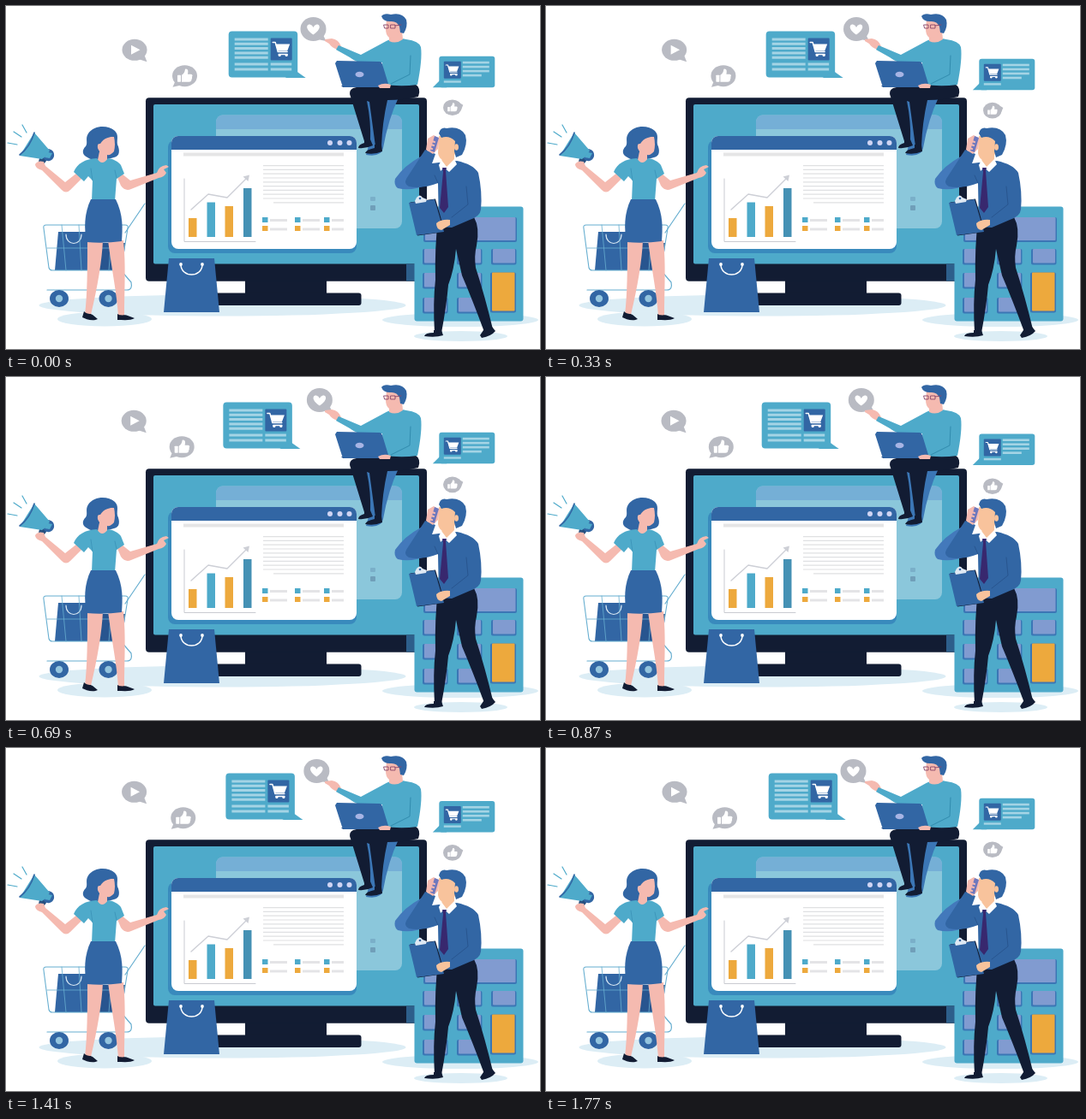
Animation, 623 px wide and 401 px high, one loop 1800 ms. Source, as an HTML page with a canvas:

```html
<!DOCTYPE html>
<html lang="en">
<head>
<meta charset="utf-8">
<title>Online marketing</title>
<style>
html, body { margin: 0; width: 100%; height: 100%; overflow: hidden; background: #fff; }
canvas { display: block; }
</style>
</head>
<body>
<canvas id="stage" width="623" height="401"></canvas>
<script>
const ctx = document.getElementById('stage').getContext('2d');
const NAVY = '#121c33', TEAL = '#4eaaca', BLUE = '#3266a4', DEEP = '#28558f', SKIN = '#f5bab0',
  PEACH = '#f8c39c', ORANGE = '#eda93d', GRAY = '#b9bbc3', PALE = '#a4d4e5', SHADE = '#3b76b5',
  GROUND = '#dcedf5', KEY = '#819bd0', LINE = '#67aed0';
let g = ctx;

const fill = (c, d) => { g.fillStyle = c; g.fill(new Path2D(d)); };
function line(c, w, d) {
  g.strokeStyle = c;
  g.lineWidth = w;
  g.lineCap = g.lineJoin = 'round';
  g.stroke(new Path2D(d));
}
function box(c, x, y, w, h, r = 0) {
  g.fillStyle = c;
  g.beginPath();
  g.roundRect(x, y, w, h, r);
  g.fill();
}
function oval(c, x, y, rx, ry = rx) {
  g.fillStyle = c;
  g.beginPath();
  g.ellipse(x, y, rx, ry, 0, 0, Math.PI * 2);
  g.fill();
}
function at(x, y, draw, k = 1) {
  g.save();
  g.translate(x, y);
  g.scale(k, k);
  draw();
  g.restore();
}

function ground() {
  oval(GROUND, 252.5, 350, 214, 12.5);
  oval(GROUND, 115, 366, 55, 8.5);
  oval(GROUND, 530, 367, 91, 8);
  oval(GROUND, 530.5, 386, 54.5, 6);
}

function monitor() {
  box(NAVY, 279, 318, 95, 20);
  box(NAVY, 236, 335.5, 178.5, 14.5, 3);
  box(NAVY, 163, 107.3, 328, 214.5, 4);
  box(TEAL, 172, 115, 310, 186.5, 2);
  box('#8bc7db', 245, 127.5, 217, 132.5, 8);
  box('#75afd6', 245, 127.5, 217, 16.5, [8, 8, 0, 0]);
  box('#7aafc9', 425, 223, 6, 5, 1);
  box('#709fb9', 425, 233, 6, 6, 1);
  box('#2d5f8b', 467, 301.5, 10, 20);
}

function browser() {
  box('#398abd', 189, 157, 220, 132, 8);
  box('#fff', 193, 152, 216, 132, 8);
  box(BLUE, 193, 152, 216, 16, [8, 8, 0, 0]);
  for (const x of [378, 389.5, 400.5]) oval('#d0d5f4', x, 160, 3);
  box('#e5e5e6', 207, 171.5, 187, 4);

  line('#c9cbd1', 1, 'M208 202V275.5H291');
  const bars = [[213, 248, ORANGE], [234.5, 229.5, TEAL], [255.5, 234, ORANGE], [277, 213, '#4591b4']];
  for (const [x, y, c] of bars) box(c, x, y, 9.5, 270 - y);
  line('#cdcfd6', 1.4, 'M216 238L236 220L258 224L281 201');
  fill('#cdcfd6', 'M284 197.5L282.5 205L276.5 199.5Z');

  for (let i = 0; i < 10; i++) {
    const x = i === 9 ? 312 : 300;
    box('#dfe0e2', x, 186 + i * 4.8, 394 - x, 1.2);
  }
  [299, 337, 371].forEach((x, i) => {
    box(TEAL, x, 247, 6.5, 6);
    box(ORANGE, x, 257, 6.5, 6);
    const w = i === 2 ? 14 : 20;
    box('#e4e4e6', x + 9, 249, w, 3);
    box('#e4e4e6', x + 9, 259.5, w, 3);
  });
}

function frontBag() {
  fill(BLUE, 'M190 295H243L249 358H184Z');
  line('#fff', 1.5, 'M204 302C204 318 229 318 229 302');
  oval('#fff', 204, 302, 1.9);
  oval('#fff', 229, 302, 1.9);
}

function trolley() {
  fill(DEEP, 'M108 277H139L136 309H108Z');
  fill(BLUE, 'M61 264H97L103 309H57Z');
  line('#d7e6f2', 1.2, 'M70 267C70 281 88 281 88 267');
  line(LINE, 1.1, 'M47 256H139Q143 256 142 260L134 309H54Q51 309 50 306L44 260Q43 256 47 256Z');
  line(LINE, .8, 'M48 283H138M65 256L70 309M85 256L88 309M105 256V309M124 256L120 309');
  line(LINE, 1.2, 'M139 265L162 231M134 309L146 323Q148 332 141 332H48');
  for (const x of [62, 119.5]) {
    oval(BLUE, x, 342, 11, 10);
    oval('#94c5df', x, 342, 4.2);
  }
}

function megaphone() {
  line(TEAL, 1.2, 'M19 139L24 148M9 147L18 153M2 160L13 162');
  fill('#27507f', 'M39 178L46 176L47 181L42 188L37 186Z');
  fill(BLUE, 'M41 173C45 167 50 166 54 169C58 173 56 180 51 181C47 182 43 179 41 173Z');
  fill(TEAL, 'M33 148L51 169Q48 175 42 179L16 175Z');
  fill(TEAL, 'M49 171L54 172L51 178L45 177Z');
  line(BLUE, 1.6, 'M33 148Q28 165 16 174');
}

function woman() {
  fill(SKIN, 'M95 274H113C112 297 107 328 99 361H92C95 337 95 305 95 274Z');
  fill(SKIN, 'M119 274H137C140 304 138 330 138 362H131C129 334 123 306 119 274Z');
  fill(NAVY, 'M91 357C95 361 98 359 101 361L107 366C101 369 93 366 89 364Z');
  fill(NAVY, 'M130 360C135 363 139 360 142 362L150 365C146 368 137 367 130 367Z');
  fill(SKIN, 'M83 195L90 200L75 215Q70 220 65 215L42 192Q34 190 34 185Q37 180 44 182L46 187L69 206Z');
  fill(SKIN, 'M129 198L135 196L145 204L176 195Q178 187 187 186L190 188L184 191L187 195Q185 200 178 201L146 214Q139 217 134 210Z');
  fill(BLUE, 'M96 149C103 139 119 139 127 146C132 151 129 156 130 162C133 168 133 176 126 177C112 181 102 182 95 177C89 174 88 169 93 164C96 160 92 155 96 149Z');
  fill(SKIN, 'M108 158Q115 151 126 153Q128 162 126 170Q122 175 118 174L118 184Q111 188 107 180L109 170Q105 165 108 158Z');
  fill(BLUE, 'M101 148C112 141 125 143 129 152C121 153 114 154 110 161C106 160 105 166 109 170C106 176 103 176 99 177Z');
  fill(TEAL, 'M106 178Q112 188 119 178C126 179 131 182 134 186L138 196L129 202L127 228H100L101 204L96 199L91 205L79 194C83 184 92 179 106 178Z');
  line('#3a91b6', .8, 'M101 204L99 190M129 201L127 192');
  fill(BLUE, 'M99 226H128C137 244 136 260 135 275Q114 278 94 276C91 260 91 243 99 226Z');
}

function sitter() {
  fill(SHADE, 'M420 108L458 107Q446 132 440 166Q438 177 420 174L424 160Z');
  // legs and shoes
  fill(NAVY, 'M405 96Q426 90 477 91Q485 96 481 106Q464 110 445 110Q439 136 438 164H431L424 112L421 111Q426 135 425 158H418L402 106Q399 99 405 96Z');
  fill(NAVY, 'M418 156H425L428 163Q420 167 411 166Q411 162 418 160Z');
  fill(NAVY, 'M430 162H438L439 170Q430 174 419 172Q420 168 430 166Z');
  // pointing arm and torso
  fill(SKIN, 'M372 39L380 38Q388 39 391 47L387 51Q380 49 377 44L372 41Z');
  fill(TEAL, 'M388 46L414 57L440 43Q452 35 467 39Q482 41 484 48Q486 62 480 92Q457 95 440 91L439 66L420 67Q410 67 401 60L385 51Z');
  fill(SKIN, 'M447 31L462 29L463 39Q455 45 447 41Z');
  fill(SKIN, 'M444 16H460L463 29Q456 38 447 37Q443 34 443 27Z');
  fill(BLUE, 'M438 12Q441 8 449 10Q462 7 467 16Q469 24 464 32L460 31L459 24Q456 17 448 18Q440 18 438 12Z');
  line('#8a4668', .9, 'M441 22H446V26H442ZM449 22H454V26H449ZM454 23L461 22');
  line('#318cae', 1, 'M472 58L471 80L449 91');
  // laptop
  fill(DEEP, 'M391 93L444 91L447 95H393Z');
  fill(BLUE, 'M386 64L436 65Q438 65 439 68L446 91Q446 94 443 95H396Q393 95 392 92L384 67Z');
  oval('#a7b4e4', 412.5, 80, 5, 3.3);
  fill(SKIN, 'M434 93Q441 89 449 92L448 96H436Z');
}

function calculator() {
  box(TEAL, 476.5, 234.5, 127, 134, 3);
  const key = (x, y, w, h, c = KEY) => {
    box(SHADE, x, y, w, h, 2);
    box(c, x + 2, y, w - 3.5, h - 2, 1);
  };
  key(487, 247, 109, 29);
  for (const y of [284, 312, 341]) {
    for (const x of [486, 526, 566]) {
      if (x < 566 || y < 300) key(x, y, 29.5, 18.5);
    }
  }
  key(565, 311.5, 30, 47, ORANGE);
}

function caller() {
  fill('#4379bb', 'M454 202Q465 186 484 176L491 173V209Q473 217 457 213Q452 209 454 202Z');
  // trousers and shoes
  fill(NAVY, 'M504 249L546 247Q553 259 549 280Q546 292 548 306Q559 340 568 378L558 381Q544 343 532 315L525 284Q523 308 516 326Q514 350 508 382H500Q498 346 501 320Q500 283 504 249Z');
  fill(NAVY, 'M499 379H508L510 385Q501 388 488 386Q489 382 499 382Z');
  fill(NAVY, 'M557 379L567 375L571 380Q566 386 555 388L553 385Z');
  // jacket
  fill(BLUE, 'M505 183L526 181Q545 185 551 195Q556 218 554 238Q553 246 541 250L520 259L505 258L504 207Q486 214 470 211Q464 208 467 202L489 168L501 173L497 184Z');
  line(DEEP, 1, 'M537 211L539 232L520 247M504 207L500 198');
  fill(PEACH, 'M509 172H523V184L515 190L508 184Z');
  fill('#fff', 'M508 180L514 188L523 179L526 185L517 194L511 189L507 193L505 186Z');
  fill('#38286e', 'M509 189H514L513 193L516 235L511 242L506 236L510 194Z');
  // head and phone
  fill(PEACH, 'M505 152H524L526 169Q521 181 511 180Q505 179 504 172Z');
  fill(BLUE, 'M505 149Q507 141 514 143Q530 140 536 151Q539 162 532 174L525 177L523 170L524 158Q517 151 508 154Z');
  oval(PEACH, 525.5, 165, 2.5, 3.8);
  fill(SKIN, 'M492 155L499 151L506 155L504 167L498 173L490 168Z');
  fill('#6e78bd', 'M500 152L505 154L500 171L495 169Z');
  line(SKIN, 2.2, 'M494 157L500 159M493 161L499 163M492 165L497 167');
  // clipboard
  fill(NAVY, 'M471.5 229.5L501 225.5L512 264L480 268.5Z');
  fill(BLUE, 'M470 230L500 226L511 264L479 268Z');
  fill('#dfe9f4', 'M477 228L479 224Q483 219 486 224L491 226L490 229L478 231Z');
  oval(BLUE, 483, 225, 1.3);
  fill(PEACH, 'M502 254Q508 249 518 250V256L508 262Q502 261 502 254Z');
}

const thumb = () => {
  box('#fff', -8.5, -1, 4, 8, .6);
  fill('#fff', 'M-3.5 -1Q0 -3 .5 -8Q5 -9 3.5 -2H7.5Q10 -1 8.5 1Q9 3 8 4Q8 7 5 7H-3.5Z');
};
const cart = () => {
  line('#fff', 1.4, 'M-10 -7H-7L-4 4H7M-3 7H7');
  fill('#fff', 'M-7 -5H10L7 3H-4Z');
  oval('#fff', -2, 8, 1.6);
  oval('#fff', 6, 8, 1.6);
};

function playBubble() {
  oval(GRAY, 0, 0, 14.5, 12.5);
  fill(GRAY, 'M5 11L14.5 14L11 5Z');
  fill('#fff', 'M-4 -5.5L6.5 0L-4 5.5Z');
}
function likeBubble() {
  oval(GRAY, 0, 0, 14.5, 12.5);
  fill(GRAY, 'M-11 6L-14 13L-5 11Z');
  at(0, 0, thumb);
}
function smallLike() {
  oval(GRAY, 0, 0, 10.8, 9.3);
  fill(GRAY, 'M6 -7L12.5 -3L10 3Z');
  at(0, 0, thumb, .66);
}
function heartBubble() {
  oval(GRAY, 0, 0, 15, 14);
  fill(GRAY, 'M5 12L15 14L11 6Z');
  fill('#fff', 'M0 6.5C-11 -1 -7 -6 -4 -5.5Q-1 -5 0 -2Q1 -5 4 -5.5C7 -6 11 -1 0 6.5Z');
}
function bigCard() {
  box(TEAL, 0, 0, 80.5, 54, 4);
  fill(TEAL, 'M78 46L90 54.5H66Z');
  for (let i = 0; i < 5; i++) box(PALE, 7, 8 + i * 5.3, 39, 3);
  for (const y of [37, 43]) {
    box(PALE, 7, y, 39, 3);
    box(PALE, 49, y, 24.5, 3);
  }
  box(BLUE, 49, 8, 25, 26, 1);
  at(61.5, 20, cart);
}
function smallCard() {
  box(TEAL, 0, 0, 65, 36.5, 3);
  fill(TEAL, 'M1 28L-7.5 36.5H9Z');
  [31, 31, 31, 22].forEach((w, i) => box(PALE, 27.5, 6 + i * 5, w, 2.6));
  box(PALE, 5.5, 28.5, 20, 2.4);
  box(BLUE, 5.5, 6, 20, 20, 1);
  at(15.5, 15.5, cart, .76);
}

function layer(...parts) {
  const c = document.createElement('canvas');
  c.width = 623;
  c.height = 401;
  g = c.getContext('2d');
  parts.forEach(part => part());
  g = ctx;
  return c;
}
const back = layer(ground, monitor, browser, frontBag, trolley, megaphone, woman, calculator, caller);
const front = layer(sitter);

const LOOP = 1800, STEP = 30;
function frame(now) {
  const n = Math.floor((now % LOOP) / STEP);
  const p = Math.min(n, 59 - n) / 29; // steady drift out and back
  ctx.fillStyle = '#fff';
  ctx.fillRect(0, 0, 623, 401);
  ctx.drawImage(back, 0, 0);
  at(150 - p, 51.3, playBubble);
  at(208.5 - 4.2 * p, 81.7, likeBubble);
  at(259.7 - 8 * p, 29.5, bigCard);
  at(358.5 + 9.3 * p, 27, heartBubble);
  at(505.3, 58.8 + 7.6 * p, smallCard);
  at(520.8, 118.7 + 9 * p, smallLike);
  ctx.drawImage(front, 0, 0);
}

let start;
function tick(now) {
  start ??= now;
  frame(Math.max(0, now - start));
  requestAnimationFrame(tick);
}
frame(0);
requestAnimationFrame(tick);
</script>
</body>
</html>
```
